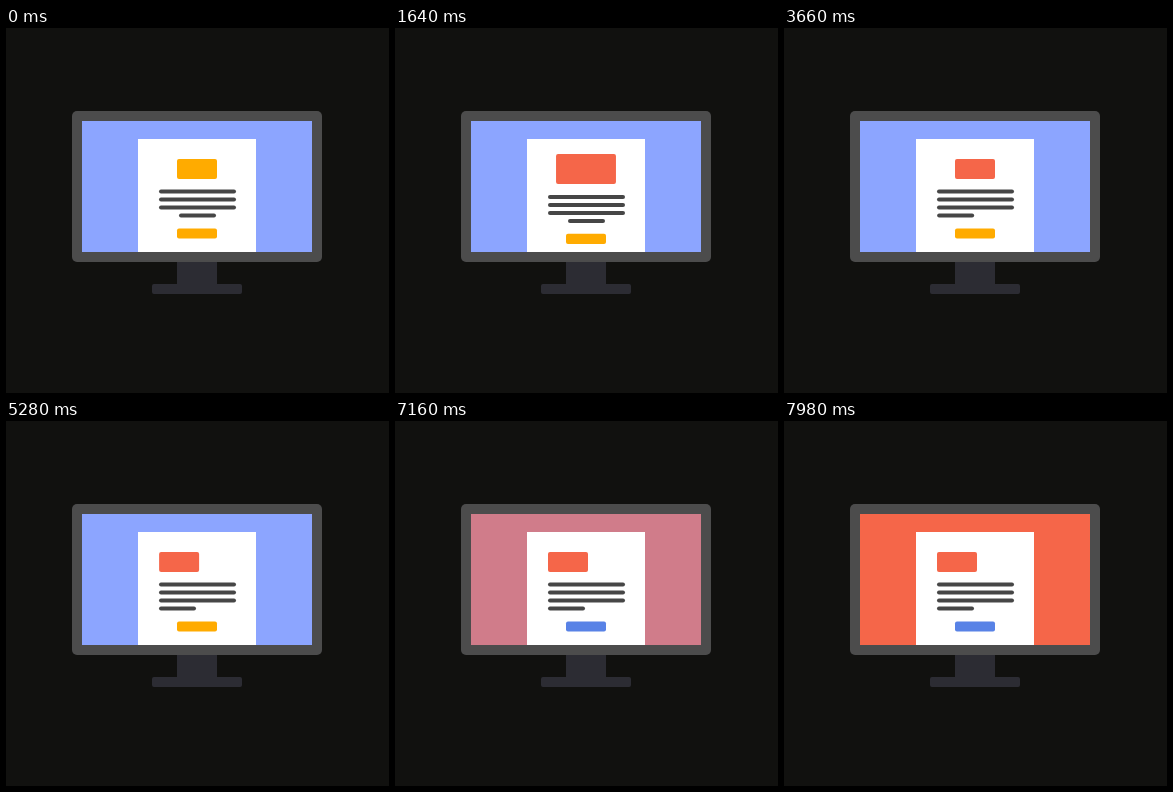
These frames come from a looping animation (383 by 365 pixels, 8 s). An HTML page with a canvas:

```html
<!DOCTYPE html>
<html lang="en">
<head>
<meta charset="utf-8">
<title>Page on a monitor</title>
<style>
html, body { margin: 0; width: 100%; height: 100%; overflow: hidden; background: #11110f; }
canvas { display: block; width: 383px; height: 365px; }
</style>
</head>
<body>
<canvas id="stage"></canvas>
<script>
const W = 383, H = 365, LOOP = 8000;
const BLUE = [140, 165, 255], RED = [245, 102, 73];
const AMBER = [255, 171, 0], BUTTON_BLUE = [88, 130, 230];

const canvas = document.getElementById('stage');
const ctx = canvas.getContext('2d');
const scale = window.devicePixelRatio || 1;
canvas.width = Math.round(W * scale);
canvas.height = Math.round(H * scale);
ctx.scale(scale, scale);

// Exponential ease-out from 0 to 1.
function ease(time, start, duration) {
  const p = (time - start) / duration;
  if (p <= 0) return 0;
  return p >= 1 ? 1 : 1 - Math.pow(2, -10 * p);
}

const lerp = (a, b, p) => a + (b - a) * p;
const mix = (a, b, p) => `rgb(${a.map((v, i) => Math.round(lerp(v, b[i], p))).join(',')})`;

function box(x, y, w, h, color, radius = 0) {
  ctx.fillStyle = color;
  ctx.beginPath();
  ctx.roundRect(x, y, w, h, radius);
  ctx.fill();
}

function draw(t) {
  const tint = ease(t, 2, 1000);
  const grow = ease(t, 915, 900);
  const shrink = ease(t, 2060, 900);
  const alignText = ease(t, 3303, 500);
  const moveImage = ease(t, 4622, 900);
  const recolor = ease(t, 5803, 500);
  const backdrop = ease(t, 7004, 1050);
  const big = grow - shrink;

  box(0, 0, W, H, '#11110f');
  box(171, 232, 40, 26, '#2c2c33');
  box(146, 256, 90, 10, '#2c2c33', 2);
  box(66, 83, 250, 151, '#4c4c4c', 5);
  box(76, 93, 230, 131, mix(BLUE, RED, backdrop));
  box(132, 111, 118, 113, '#fff');

  const imageX = 171 - 10 * big - 18 * moveImage;
  box(imageX, 131 - 5 * big, 40 + 20 * big, 20 + 10 * big, mix(AMBER, RED, tint), 2);

  const textY = 161.5 + 5.6 * big;
  for (let i = 0; i < 3; i++) box(153, textY + 8 * i, 77, 4, '#464646', 2);
  box(lerp(173, 153, alignText), textY + 24, 37, 4, '#464646', 2);

  const buttonY = 200.4 + 5.4 * big - shrink + alignText;
  box(171, buttonY, 40, 10.2, mix(AMBER, BUTTON_BLUE, recolor), 2);
}

const began = performance.now();
function frame() {
  draw((performance.now() - began) % LOOP);
  requestAnimationFrame(frame);
}
frame();
</script>
</body>
</html>
```
